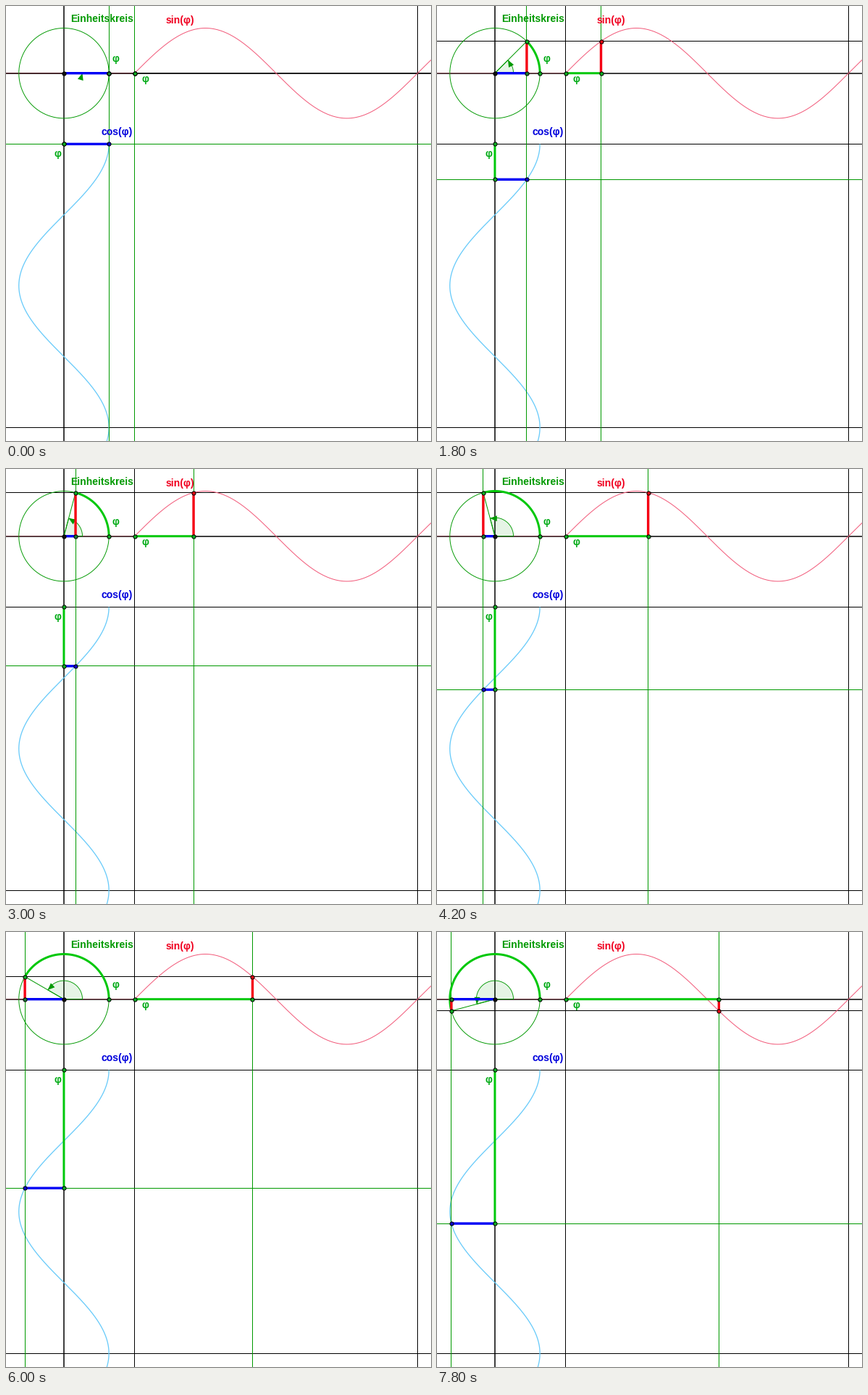
A matplotlib script for the animation above (8 s loop, 587 by 600 pixels).

```python
import numpy as np
import matplotlib.pyplot as plt
from matplotlib.animation import FuncAnimation

W, H = 587, 600
PX = 0.72                      # points per pixel at 100 dpi
R = 62.2                       # unit length
CX, CY = 79.95, 92.7           # circle centre
SX = CX + R * np.pi / 2        # start of the sine graph
CS = CY + R * np.pi / 2        # start of the cosine graph
SECTOR = 25.6

GREEN, BRIGHT, BLUE, RED = "#009900", "#00c80a", "#0000f5", "#f50014"
BLACK = "#000000"

fig = plt.figure(figsize=((W + 1e-6) / 100, (H + 1e-6) / 100), dpi=100,
                 facecolor="white")
ax = fig.add_axes([0, 0, 1, 1])
ax.set_xlim(0, W)
ax.set_ylim(H, 0)
ax.axis("off")


def line(color, width, x=(), y=(), z=2, **kw):
    return ax.plot(x, y, color=color, lw=width * PX, zorder=z, snap=False,
                   solid_capstyle="butt", **kw)[0]


def crisp(v):
    """Centre of the pixel that holds v, for sharp one-pixel lines."""
    return [np.floor(v) + 0.5] * 2


def hline(y, color=BLACK, z=1):
    return line(color, 1, (-5, W + 5), crisp(y), z)


def vline(x, color=BLACK, z=1):
    return line(color, 1, crisp(x), (-5, H + 5), z)


def dot(color, x=0, y=0, z=8):
    return ax.plot([x], [y], "o", ms=5.2 * PX, mfc=color, mec=BLACK,
                   mew=1 * PX, snap=False, zorder=z)[0]


def label(x, y, text, color):
    ax.text(x, y, text, color=color, fontsize=14 * PX, weight="bold",
            family=["Liberation Sans", "DejaVu Sans"], va="baseline", zorder=9)


def polar(r, a):
    return CX + r * np.cos(a), CY - r * np.sin(a)


# Fixed grid and axes
line(BLACK, 1.5, [round(CX)] * 2, (-5, H + 5), 1)
line(BLACK, 1.5, (-5, W + 5), [round(CY)] * 2, 1)
vline(SX)
vline(CX + R * 2.5 * np.pi)
hline(CS)
hline(CY + R * 2.5 * np.pi)

# Circle and graphs
turn = np.linspace(0, 2 * np.pi, 200)
line(GREEN, 0.95, *polar(R, turn))
t = np.linspace(0, 7, 400)
line("#f25a7a", 1, SX + R * t, CY - R * np.sin(t))
line("#e0405a", 1, (-5, SX), (CY, CY), alpha=0.4)
line("#69cbfa", 1.3, CX + R * np.cos(t), CS + R * t)

# Moving guides
level = hline(CY)
cos_guide = vline(CX, GREEN, 2)
phi_guide = vline(SX, GREEN, 2)
phi_level = hline(CS, GREEN, 2)

# Moving angle, segments and arc
sector = ax.fill([0], [0], fc=(0, 0.6, 0, 0.1), ec=GREEN, lw=0.9 * PX,
                 zorder=2)[0]
head = ax.fill([0], [0], fc=GREEN, ec="none", zorder=3)[0]
radius = line(GREEN, 1, z=3)
arc = line(BRIGHT, 3, z=4)
phi_x = line(BRIGHT, 3, z=4)
phi_y = line(BRIGHT, 3, z=4)
cos_top = line(BLUE, 3.4, z=5)
cos_low = line(BLUE, 3.4, z=5)
sin_circle = line(RED, 3.4, z=5)
sin_graph = line(RED, 3.4, z=5)

# Points
rim = dot("#0fae23")
dot("#0fae23", CX + R, CY)
foot = dot("#1a7d34")
dot("#101010", CX, CY)
tip_sin = dot("#e00a14", z=7)
phi_end = dot("#0fae23")
dot("#0fae23", SX, CY)
dot("#0fae23", CX, CS)
phi_low = dot("#0fae23")
tip_cos = dot("#0a0ac8")

label(89, 22, "Einheitskreis", GREEN)
label(221, 24, "sin(φ)", "#f0001e")
label(131, 178, "cos(φ)", "#0000dc")
for x, y in ((146, 77), (187, 105), (66, 208)):
    label(x, y, "φ", "#00aa14")


def arrow_head(a):
    tip = np.array(polar(SECTOR, a))
    back = np.array(polar(SECTOR - 1, a - 0.36)) - tip
    back /= np.hypot(*back)
    side = np.array([-back[1], back[0]])
    base = tip + 9.5 * back
    return [tip, base + 4 * side, base - 4 * side]


def draw(i):
    a = np.radians(15 * (i // 3))
    px, py = polar(R, a)
    gx, gy = SX + R * a, CS + R * a

    level.set_ydata(crisp(py))
    cos_guide.set_xdata(crisp(px))
    phi_guide.set_xdata(crisp(gx))
    phi_level.set_ydata(crisp(gy))

    sweep = np.linspace(0, a, 80)
    sx, sy = polar(SECTOR, sweep)
    sector.set_xy(np.column_stack([np.r_[CX, sx], np.r_[CY, sy]]))
    sector.set_visible(a > 0)
    head.set_xy(arrow_head(a))
    radius.set_data([CX, px], [CY, py])
    arc.set_data(*polar(R, sweep))
    phi_x.set_data([SX, gx], [CY, CY])
    phi_y.set_data([CX, CX], [CS, gy])
    cos_top.set_data([CX, px], [CY, CY])
    cos_low.set_data([CX, px], [gy, gy])
    sin_circle.set_data([px, px], [CY, py])
    sin_graph.set_data([gx, gx], [CY, py])

    for point, x, y in ((rim, px, py), (foot, px, CY), (tip_sin, gx, py),
                        (phi_end, gx, CY), (phi_low, CX, gy),
                        (tip_cos, px, gy)):
        point.set_data([x], [y])
    return []


anim = FuncAnimation(fig, draw, frames=40, interval=200, repeat=True,
                     repeat_delay=0, blit=False)
plt.show()
```
